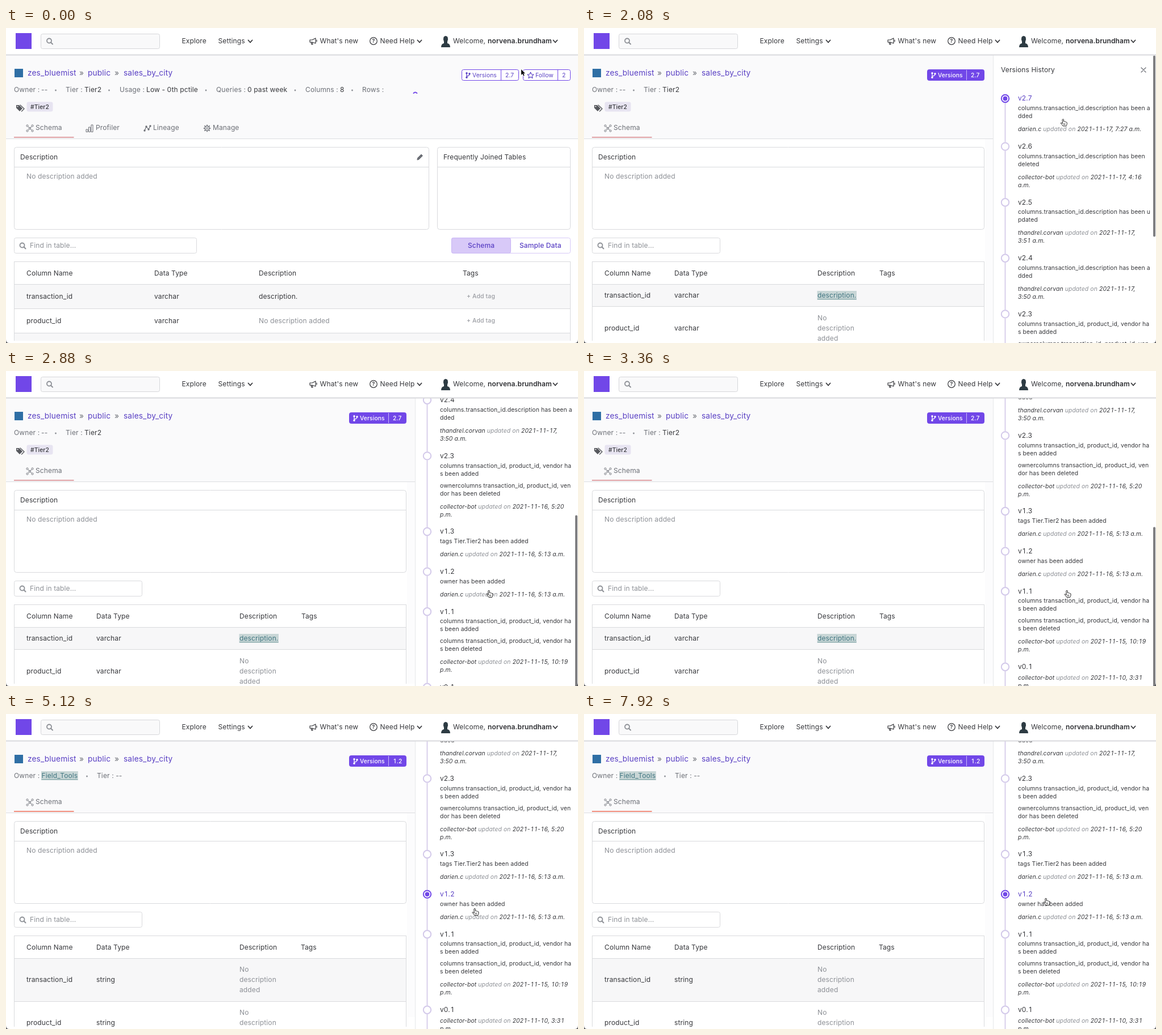
Recreate the animation shown at these times as an HTML page with a canvas. Size 1007 by 556 pixels, loop 8000 ms.

```html
<!DOCTYPE html>
<html lang="en">
<head>
<meta charset="utf-8">
<title>Table version history</title>
<style>
html, body { margin: 0; width: 100%; height: 100%; overflow: hidden; background: #fff; }
canvas { display: block; width: 1007px; height: 556px; }
</style>
</head>
<body>
<canvas id="stage" width="1007" height="556"></canvas>
<script>
const ctx = document.getElementById('stage').getContext('2d');
const W = 1007, H = 556, LOOP = 8000, STEP = 80;
const INK = '#37383c', SOFT = '#6c6f76', PALE = '#8d9096';
const PURPLE = '#7147e8', LINK = '#5a41c4', BORDER = '#d9dadd';
const OPEN_AT = 2000, PICK_AT = 4560;

// Keys are [time, value, value...]
const CURSOR = [[0, 907, 73], [400, 876, 79], [800, 843, 85], [1040, 841, 85], [2000, 841, 85],
  [2320, 850, 387], [4000, 850, 387], [4400, 825, 343], [6640, 825, 343], [7200, 813, 325]];
const SCROLL = [[2320, 0], [2560, 109], [2880, 355], [3120, 384], [3360, 391]];
const SCROLLBAR = [[3680, 1], [3920, 0]];

const ADDED = ['columns transaction_id, product_id, vendor ha', 's been added'];
const fieldNote = (a, b) => [['columns.transaction_id.description has been' + a, b]];
const HISTORY = [
  ['2.7', fieldNote(' a', 'dded'), 'darien.c', '2021-11-17, 7:27 a.m.'],
  ['2.6', fieldNote('', 'deleted'), 'collector-bot', '2021-11-17, 4:16', 'a.m.'],
  ['2.5', fieldNote(' u', 'pdated'), 'thandrel.corvan', '2021-11-17,', '3:51 a.m.'],
  ['2.4', fieldNote(' a', 'dded'), 'thandrel.corvan', '2021-11-17,', '3:50 a.m.'],
  ['2.3', [ADDED, ['ownercolumns transaction_id, product_id, ven', 'dor has been deleted']],
    'collector-bot', '2021-11-16, 5:20', 'p.m.'],
  ['1.3', [['tags Tier.Tier2 has been added']], 'darien.c', '2021-11-16, 5:13 a.m.'],
  ['1.2', [['owner has been added']], 'darien.c', '2021-11-16, 5:13 a.m.'],
  ['1.1', [ADDED, [ADDED[0], 's been deleted']], 'collector-bot', '2021-11-15, 10:19', 'p.m.'],
  ['0.1', [], 'collector-bot', '2021-11-10, 3:31', 'p.m.']
];

function track(keys, t) {
  if (t <= keys[0][0]) return keys[0].slice(1);
  for (let i = 1; i < keys.length; i++) {
    const a = keys[i - 1], b = keys[i];
    if (t < b[0]) {
      const k = (t - a[0]) / (b[0] - a[0]);
      return a.slice(1).map((v, n) => v + (b[n + 1] - v) * k);
    }
  }
  return keys[keys.length - 1].slice(1);
}

function setFont(size, weight = 400, style = 'normal') {
  ctx.font = `${style} ${weight} ${size}px Inter, sans-serif`;
  ctx.letterSpacing = size * 0.01 + 'px';
}

// Text is centred on y by its cap height, with tabular figures; returns the end x.
function text(s, x, y, color = INK, size = 12, weight = 400, style = 'normal') {
  setFont(size, weight, style);
  ctx.fillStyle = color;
  const cell = ctx.measureText('0').width;
  for (const part of s.split(/(1)/)) {
    const w = ctx.measureText(part).width;
    const slot = part === '1' ? cell : w;
    ctx.fillText(part, x + (slot - w) / 2, y + size * 0.364);
    x += slot;
  }
  return x;
}

function rect(x, y, w, h, fill) {
  ctx.fillStyle = fill;
  ctx.fillRect(x, y, w, h);
}

function box(x, y, w, h, fill, stroke, r = 3) {
  ctx.beginPath();
  ctx.roundRect(x + 0.5, y + 0.5, w, h, r);
  if (fill) { ctx.fillStyle = fill; ctx.fill(); }
  if (stroke) { ctx.strokeStyle = stroke; ctx.lineWidth = 1; ctx.stroke(); }
}

function disc(x, y, r, fill) {
  ctx.beginPath();
  ctx.arc(x, y, r, 0, 7);
  ctx.fillStyle = fill;
  ctx.fill();
}

function ring(x, y, r, color, width = 1) {
  ctx.beginPath();
  ctx.arc(x, y, r, 0, 7);
  ctx.strokeStyle = color;
  ctx.lineWidth = width;
  ctx.stroke();
}

// Path data is drawn with its own origin at x, y.
function shape(d, x, y, stroke, width = 1, fill) {
  const path = new Path2D(d);
  ctx.save();
  ctx.translate(x, y);
  ctx.lineCap = ctx.lineJoin = 'round';
  if (fill) { ctx.fillStyle = fill; ctx.fill(path); }
  if (stroke) { ctx.strokeStyle = stroke; ctx.lineWidth = width; ctx.stroke(path); }
  ctx.restore();
}

const chevron = (x, y) => shape('M-3.5-2L0 2L3.5-2', x, y, INK, 1.8);
const dot = x => disc(x, 110, 1.4, PALE);

function magnifier(x, y) {
  ring(x - 1, y - 1, 4, PALE, 1.8);
  shape('M2 2L5 5', x, y, PALE, 2);
}

function branch(x, y, color) {
  shape('M-2.5-3V3M2.5-2Q2.5 1-2.5 1.5', x, y, color, 1.2);
  for (const [dx, dy] of [[-2.5, -3.7], [-2.5, 3.7], [2.5, -2.7]]) disc(x + dx, y + dy, 1.7, color);
}

function schemaIcon(x, y) {
  shape('M-4-4L4 4M-4 4L4-4', x, y, SOFT);
  for (const [dx, dy] of [[-4.5, -4.5], [4.5, -4.5], [-4.5, 4.5], [4.5, 4.5], [0, 0]]) {
    disc(x + dx, y + dy, 1.8, '#fafafb');
    ring(x + dx, y + dy, 1.6, SOFT);
  }
}

function gear(x, y) {
  for (let i = 0; i < 8; i++) {
    const a = i * Math.PI / 4, c = Math.cos(a), s = Math.sin(a);
    shape(`M${4 * c} ${4 * s}L${5.8 * c} ${5.8 * s}`, x, y, SOFT, 1.6);
  }
  ring(x, y, 4, SOFT, 1.2);
  ring(x, y, 1.6, SOFT);
}

function topBar() {
  rect(0, 0, W, 47, '#fff');
  rect(0, 46, W, 1, '#ececee');
  rect(0, 47, W, 1.5, '#d9dadd');
  rect(17, 9, 28, 28, PURPLE);
  box(61, 10, 209, 26, '#f9f9fa', '#d6d7da');
  magnifier(77, 23.5);
  text('Explore', 309.5, 23);
  text('Settings', 373.5, 23);
  chevron(430, 23.5);
  shape('M-6-2H-2L4-5V4L-2 2H-6ZM-4 2L-3 6H-1L-2 2M6-2V1', 541, 23, INK, 1.2);
  text("What's new", 552.5, 23);
  ring(647, 23, 6.3, INK, 1.2);
  text('?', 644.3, 23, INK, 9.5, 600);
  text('Need Help', 658.5, 23);
  chevron(728, 23.5);
  shape('M-8 11Q-8 5-3 4V1Q-5-3-3.5-7Q0-11 3.5-7Q5-3 3 1V4Q8 5 8 11Z', 774, 23, null, 0, '#2d3b43');
  text('Welcome,', 787, 23);
  text('norvena.brundham', 848, 23, '#2d2e32', 12, 600);
  chevron(967, 23.5);
}

function versionButton(x, number, solid) {
  const color = solid ? '#fff' : LINK;
  box(x, 73, 100, 19, solid ? PURPLE : '#fff', PURPLE);
  rect(x + 69, 74, 1, 18, solid ? '#c9b9fa' : PURPLE);
  branch(x + 11.5, 83.5, color);
  text('Versions', x + 19, 83, color, 10.3, solid ? 500 : 400);
  text(number, x + 77, 83, color, 10.3, solid ? 500 : 400);
}

function highlight(s, x, y) {
  setFont(12);
  const w = ctx.measureText(s).width;
  rect(x - 0.5, y - 8, w + 1, 16, '#c8d6d6');
  text(s, x, y, '#417680');
  rect(x, y + 6, w, 1, '#7fa4a6');
}

function heading(width, ruleY) {
  rect(0, 48, width, ruleY - 48, '#fafafb');
  rect(0, ruleY, width, 1, '#dcdde0');
  rect(15, 72, 15, 15, '#2f6fa5');
  text('zes_bluemist', 38, 79, LINK, 13.7);
  text('»', 129, 79, SOFT, 13.7);
  text('public', 144, 79, LINK, 13.7);
  text('»', 191, 79, SOFT, 13.7);
  text('sales_by_city', 207, 79, LINK, 13.7);
  text('Owner :', 14, 109, SOFT);
}

function tierLine() {
  text('--', 62, 109, SOFT);
  dot(87.5);
  text('Tier :', 105, 109, SOFT);
  text('Tier2', 138, 109);
  shape('M-7-5H-2L4 1L-1 6L-7 0Z', 25, 141, null, 0, '#55575c');
  shape('M0-5L7 1.5L2.5 6', 25, 141, '#55575c', 1.4);
  disc(20.5, 138.5, 1.1, '#fafafb');
  box(36, 130, 46, 17, '#e7e4f1', null, 3);
  text('#Tier2', 43, 139, INK, 10.3, 500);
}

function schemaTab(y, color) {
  schemaIcon(42, y + 1);
  text('Schema', 52, y, SOFT);
  rect(14, y + 16, 105.5, 1.7, color);
}

function card(x, y, w, title) {
  box(x, y, w, 145, '#fff', BORDER, 4);
  rect(x + 1, y + 35, w - 1, 1, BORDER);
  text(title, x + 11, y + 17.5);
}

function descriptionCard(y, w) {
  card(14, y, w, 'Description');
  text('No description added', 36, y + 52, PALE);
}

function finder(y, w) {
  box(14, y, w, 27, '#fff', BORDER);
  magnifier(29.5, y + 14.5);
  text('Find in table...', 42, y + 14, PALE);
}

function tableHead(y, w, cols) {
  rect(14, y, w, 1, BORDER);
  rect(14, y, 1, 552 - y, BORDER);
  rect(13 + w, y, 1, 552 - y, BORDER);
  ['Column Name', 'Data Type', 'Description', 'Tags']
    .forEach((s, i) => text(s, cols[i], y + 20.5));
}

function row(y, h, w, shaded) {
  if (shaded) rect(15, y, w - 2, h, '#f7f7f8');
  rect(14, y, w, 1, BORDER);
}

function stacked(y) {
  ['No', 'description', 'added'].forEach((s, i) => text(s, 411, y + i * 18, PALE));
}

function tablePage() {
  heading(W, 195);
  tierLine();
  versionButton(802, '2.7', false);
  box(910, 73, 83, 19, '#fff', PURPLE);
  rect(971, 74, 1, 18, PURPLE);
  shape('M0-5.5L1.7-1.8L5.5-1.4L2.6 1.2L3.5 5L0 3L-3.5 5L-2.6 1.2L-5.5-1.4L-1.7-1.8Z', 923.5, 83.5, LINK, 1.1);
  text('Follow', 932, 83, LINK, 10.3);
  text('2', 979, 83, LINK, 10.3);
  dot(181.5);
  text('Usage :', 200, 109, SOFT);
  text('Low - 0th pctile', 247, 109);
  dot(352);
  text('Queries :', 370, 109, SOFT);
  text('0 past week', 425, 109);
  dot(509);
  text('Columns :', 527, 109, SOFT);
  text('8', 588, 109);
  dot(609.5);
  text('Rows :', 627, 109, SOFT);
  shape('M-3 1Q0-2 3 1', 720.5, 114, PURPLE, 1.8);

  schemaTab(176, '#dc9498');
  shape('M-6 6V2H-3V6ZM-1.5 6V-2H1.5V6ZM3 6V-6H6V6Z', 147, 177, SOFT);
  text('Profiler', 158, 176, SOFT);
  shape('M-5 4L-2-3L2 2L5-4', 249, 177, SOFT, 1.2);
  for (const [dx, dy] of [[-5, 4], [-2, -3], [2, 2], [5, -4]]) disc(249 + dx, 177 + dy, 1.7, SOFT);
  text('Lineage', 259, 176, SOFT);
  gear(354, 177);
  text('Manage', 364, 176, SOFT);

  descriptionCard(210, 730);
  shape('M-4.5 4.5L-4 1.5L2.5-5L5-2.5L-1.5 4Z', 728.5, 228, SOFT, 1, SOFT);
  card(759, 210, 234, 'Frequently Joined Tables');
  finder(370, 321);
  box(784, 370, 209, 27, '#fff', '#d7c9f7');
  box(784, 370, 104, 27, '#d8c9f8', '#c9b6f5');
  text('Schema', 813, 384, LINK, 12, 500);
  text('Sample Data', 904, 384, LINK, 12, 500);

  row(452, 43, 980, true);
  row(495, 43, 980, false);
  row(538, 14, 980, true);
  tableHead(412, 980, [36, 261, 445, 804]);
  ['transaction_id', 'product_id'].forEach((s, i) => {
    const y = 473.5 + i * 43;
    text(s, 36, y);
    text('varchar', 261, y);
    text(i ? 'No description added' : 'description.', 445, y, i ? PALE : INK);
    text('+ Add tag', 811, y, '#9b9da3', 10.5, 500);
  });
}

function versionPage(picked) {
  const lift = picked ? 21 : 0;
  heading(720, 195 - lift);
  rect(706, 196 - lift, 14, 360, '#fcfcfd');
  versionButton(604, picked ? '1.2' : '2.7', true);
  if (picked) {
    highlight('Field_Tools', 62.5, 109);
    dot(142.5);
    text('Tier : --', 160, 109, SOFT);
  } else tierLine();
  schemaTab(176 - lift, picked ? '#ef7c69' : '#dc9498');
  descriptionCard(210 - lift, 690);
  finder(370 - lift, 225);

  const type = picked ? 'string' : 'varchar';
  const firstY = picked ? 469 : 472, secondY = picked ? 545 : 530;
  const firstTop = 452 - lift, secondTop = picked ? 507 : 491;
  row(firstTop, secondTop - firstTop, 691, true);
  row(secondTop, 61, 691, false);
  tableHead(412 - lift, 691, [36, 159, 411, picked ? 519 : 520]);
  text('transaction_id', 36, firstY);
  text(type, 159, firstY);
  if (picked) stacked(451);
  else highlight('description.', 411, 472);
  text('product_id', 36, secondY);
  text(type, 159, secondY);
  stacked(secondY - 18);
}

function entry([version, notes, who, when, rest], y, chosen) {
  disc(741.5, y + 0.5, 7.5, '#fff');
  ring(741.5, y + 0.5, 6.7, chosen ? PURPLE : '#d3c9ea', 2);
  if (chosen) disc(741.5, y + 0.5, 3.9, PURPLE);
  text('v' + version, 764, y, chosen ? LINK : INK);
  let line = y + (notes.length ? 17.4 : 19.5);
  notes.forEach((note, i) => {
    if (i) line += 7;
    for (const s of note) {
      text(s, 764, line, INK, 10.4);
      line += 14;
    }
  });
  if (notes.length) line += 9;
  let x = text(who + ' ', 764, line, INK, 10.4, 400, 'italic');
  x = text('updated on ', x, line, PALE, 10.4, 400, 'italic');
  text(when, x, line, INK, 10.4, 400, 'italic');
  if (rest) text(rest, 764, line + 14, INK, 10.4, 400, 'italic');
  return line + (rest ? 14 : 0) + 30.2;
}

function timeline(scroll, barAlpha, chosen) {
  ctx.save();
  ctx.beginPath();
  ctx.rect(720, 48, 287, 508);
  ctx.clip();
  rect(720, 48, 287, 508, '#fff');
  rect(719.5, 48, 1.2, 508, '#dcdde0');
  text('Versions History', 734, 74 - scroll);
  shape('M-4-4L4 4M-4 4L4-4', 985, 74 - scroll, SOFT, 1.2);
  let y = 124 - scroll;
  rect(740.5, y, 2, 1000, '#d9d0ec');
  for (const item of HISTORY) y = entry(item, y, item[0] === chosen);
  ctx.globalAlpha = barAlpha;
  box(1001.5, 48 + scroll * 0.58, 4, 320, '#7d7d80', null, 2);
  ctx.restore();
}

function pointer(x, y, hand) {
  if (hand) {
    shape('M-1 1Q0-1 1.2 1V4.5Q2.5 3.6 3.3 5Q4.8 4.3 5.4 5.7Q7 5.3 7 7V9Q6.5 11 5.6 12.5H0Q-1.5 10-4 7.5Q-3.5 5.6-1 8Z',
      x, y, '#222', 1, '#fff');
    shape('M1.4 8V10.5M3.4 8V10.5', x, y, '#222', 0.8);
  } else {
    const arrow = 'M0 0V10L2.3 7.8L4 11.5L5.7 10.7L4.1 7.2H7Z';
    shape(arrow, x, y, '#fff', 1.4);
    shape(arrow, x, y, null, 0, '#111');
  }
}

function draw(t) {
  const picked = t >= PICK_AT;
  rect(0, 0, W, H, '#fff');
  ctx.save();
  ctx.beginPath();
  ctx.rect(0, 0, W, 552);
  ctx.clip();
  if (t < OPEN_AT) tablePage();
  else versionPage(picked);
  ctx.restore();
  if (t >= OPEN_AT) timeline(track(SCROLL, t)[0], track(SCROLLBAR, t)[0], picked ? '1.2' : '2.7');
  topBar();
  shape('M0-6Q0 0 6 0H0Z', 0, H, null, 0, '#55565a');
  shape('M0-6Q0 0-6 0H0Z', W, H, null, 0, '#55565a');
  const [x, y] = track(CURSOR, t);
  pointer(x, y, x < 902);
}

function tick() {
  const t = performance.now() % LOOP;
  draw(Math.floor(t / STEP) * STEP);
  requestAnimationFrame(tick);
}
tick();
</script>
</body>
</html>
```
